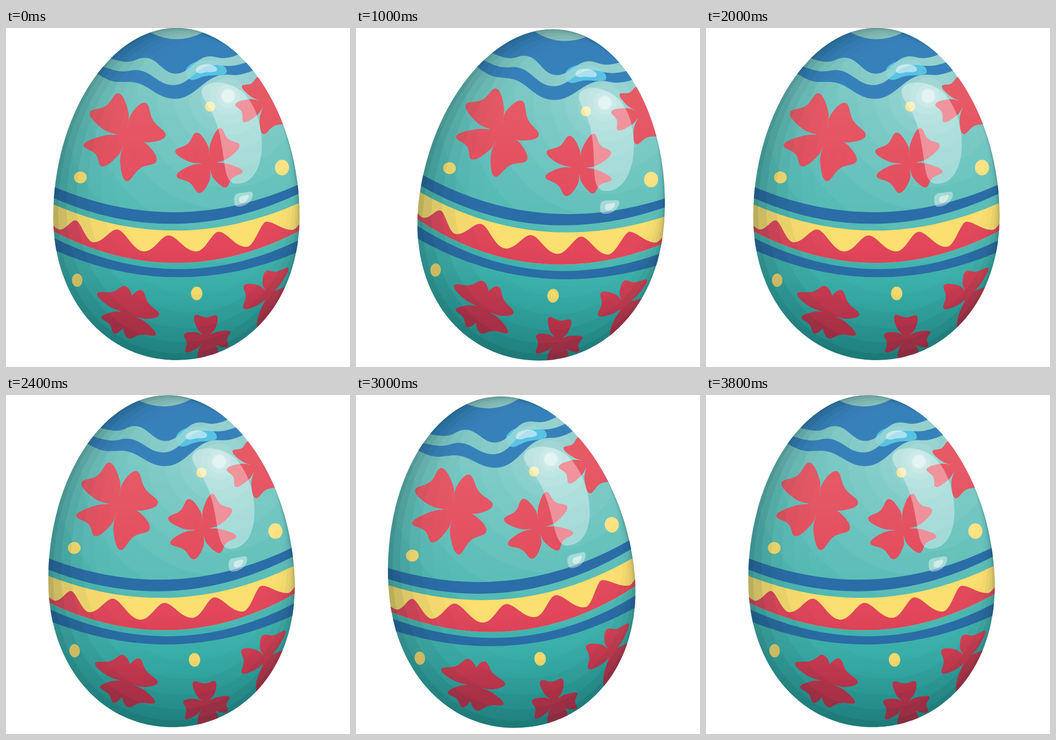
Recreate the animation shown at these times as an HTML page. Size 754 px wide and 742 px high, loop 4000 ms.

```html
<!DOCTYPE html>
<html lang="en">
<head>
<meta charset="utf-8">
<title>Rocking egg</title>
<style>
  html, body { margin: 0; width: 100%; height: 100%; overflow: hidden; background: #fff; }
  svg { display: block; width: 100vw; height: 100vh; }
</style>
</head>
<body>
<svg viewBox="0 0 754 742">
  <defs>
    <clipPath id="shell"><path id="shellPath" shape-rendering="crispEdges"/></clipPath>
    <clipPath id="blues"><path id="bluesPath"/></clipPath>
    <linearGradient id="teal" gradientUnits="userSpaceOnUse" x1="0" y1="0" x2="0" y2="726">
      <stop offset="0" stop-color="#74c2bd"/>
      <stop offset=".3" stop-color="#5bbbb6"/>
      <stop offset=".6" stop-color="#4cb7b1"/>
      <stop offset=".78" stop-color="#3bb1ac"/>
      <stop offset="1" stop-color="#29a5a0"/>
    </linearGradient>
    <linearGradient id="red" gradientUnits="userSpaceOnUse" x1="0" y1="150" x2="0" y2="650">
      <stop offset="0" stop-color="#e65a66"/>
      <stop offset=".65" stop-color="#e2475b"/>
      <stop offset="1" stop-color="#cb344e"/>
    </linearGradient>
    <linearGradient id="dusk" gradientUnits="userSpaceOnUse" x1="0" y1="540" x2="0" y2="726">
      <stop offset="0" stop-color="#04252a" stop-opacity="0"/>
      <stop offset="1" stop-color="#04252a" stop-opacity=".1"/>
    </linearGradient>
  </defs>
  <g id="egg"><g id="art" clip-path="url(#shell)"></g></g>
</svg>
<script>
const $ = id => document.getElementById(id);
const art = $('art');
const EGG = 'M373.5 0C524 0 643.5 199 643.5 412C643.5 598 526 727 373.5 727' +
            'C221 727 103.5 598 103.5 412C103.5 199 223 0 373.5 0Z';
const RED = 'url(#red)', BLUE = '#2b6da7', SKY = '#3781ba', YELLOW = '#fbdf70';
const CYAN = '#3fc8ec', SHADE = '#04252a';

function add(tag, attrs) {
  const el = document.createElementNS('http://www.w3.org/2000/svg', tag);
  for (const k in attrs) el.setAttribute(k, attrs[k]);
  art.appendChild(el);
}
const fill = (d, color, opacity = 1, extra = {}) =>
  add('path', { d, fill: color, 'fill-opacity': opacity, ...extra });
const points = text => text.split(' ').map(p => p.split(',').map(Number));

// curve with level tangents at every crest and dip
function wavy(pts, crest = .42, dip = .42) {
  const last = pts.length - 1;
  const hold = i => i === 0 || i === last ? .1 : pts[i][1] < pts[i - 1][1] ? crest : dip;
  return pts.map(([x, y], i) => {
    if (!i) return `${x} ${y}`;
    const [px, py] = pts[i - 1], w = x - px;
    return `C${px + w * hold(i - 1)} ${py} ${x - w * hold(i)} ${y} ${x} ${y}`;
  }).join('');
}

// open Catmull-Rom curve
function spline(p, k = 4.8) {
  const at = i => p[Math.max(0, Math.min(p.length - 1, i))];
  return p.slice(1).map((c, i) => {
    const [a, b, e] = [at(i - 1), p[i], at(i + 2)];
    const ctrl = (q, from, to, s) => [0, 1].map(j => q[j] + s * (to[j] - from[j]) / k);
    return `C${ctrl(b, a, c, 1)} ${ctrl(c, b, e, -1)} ${c}`;
  }).join('');
}

// four heart petals around a centre; two lobe tips each, clockwise
function clover(cx, cy, lobes) {
  const tips = points(lobes).map(([x, y]) => [x - cx, y - cy]);
  const n = tips.length, tip = i => tips[(i + n) % n];
  const mix = (a, s, b, t) => [cx + a[0] * s + b[0] * t, cy + a[1] * s + b[1] * t];
  let d = '';
  for (let i = 0; i < n; i += 2) {
    const a = tip(i), b = tip(i + 1);
    const petal = [mix(tip(i - 1), .11, a, .11), mix(a, .7, b, -.2), mix(a, 1, b, 0),
      mix(a, .46, b, .46), mix(b, 1, a, 0), mix(b, .7, a, -.2), mix(b, .11, tip(i + 2), .11)];
    d += (i ? 'L' : 'M') + petal[0] + spline(petal);
  }
  fill(d + 'Z', RED);
}

// belt between two bowed edges: left, control and right heights
const belt = ([l, c, r], [l2, c2, r2], color) =>
  fill(`M104 ${l}Q373 ${c} 643 ${r}h3V${r2}h-3Q373 ${c2} 104 ${l2}h-3V${l}Z`, color);
const dot = (cx, cy, rx, ry) => add('ellipse', { cx, cy, rx, ry, fill: YELLOW });

function glow() {
  for (let i = 11; i >= 0; i--)
    add('circle', { cx: 487, cy: 149, r: 14 + 2.9 * i * i, fill: '#fff',
      'fill-opacity': .04 + .3 * Math.exp(-.6 * i) });
}

function waves() {
  const rim = points('220,64 266,74 304,65 372,100 447,62 476,66 530,50');
  const upper = points('200,80 257,95 284,92 367,125 455,81 490,83 545,69');
  const lower = points('185,92 246,118 270,118 370,155 482,102 502,103 560,86');
  const crown = `M220 -5L${wavy(rim)}V-5Z`;
  const wave = `M${wavy(upper)}L${wavy(lower.reverse())}Z`;
  $('bluesPath').setAttribute('d', crown + wave);
  fill(crown, SKY);
  fill(wave, SKY);
  fill('M300 -5L317 10Q373 39 432 10L450 -5Z', '#8bc4bf');
}

function belts() {
  belt([347, 462, 342], [372, 490, 362], BLUE);
  belt([386, 502, 383], [445, 584, 444], YELLOW);
  const zigzag = points('101,430 118,441 152,421 192,469 243,441 303,489 356,454 ' +
    '417,489 466,446 527,479 571,424 628,442 646,426');
  fill(`M${wavy(zigzag, .3, .42)}V444H643Q373 584 104 445H101Z`, RED);
  belt([459, 594, 464], [485, 604, 489], BLUE);
}

function flowers() {
  clover(263, 237, '184,186 247,143 306,164 350,235 330,291 264,335 211,303 170,256');
  clover(446, 297, '371,270 418,229 469,219 512,257 519,314 481,349 424,361 374,324');
  clover(568, 162, '522,206 503,166 517,128 553,108 578,112 622,170 615,206 564,232');
  clover(268, 625, '200,581 262,565 297,574 336,627 328,672 268,679 238,669 209,633');
  clover(439, 678, '414,629 462,630 491,664 486,698 464,714 422,726 394,710 391,670');
  clover(576, 582, '521,614 522,563 569,533 619,525 645,580 560,664');
}

// shade outside ever smaller shells
function shading() {
  for (let i = 1; i <= 6; i++) {
    const s = 1 - .024 * i ** 1.4;
    fill(`M-754 -742H1508V1484H-754Z${EGG}`, SHADE, .1 - .015 * i, {
      'fill-rule': 'evenodd',
      transform: `translate(${560 * (1 - s)} ${100 * (1 - s)}) scale(${s})`
    });
  }
  fill('M0 500H754V742H0Z', 'url(#dusk)');
}

function gloss() {
  const drop = 'M429 137C434 114 480 112 515 137C575 185 580 341 506 341' +
               'C465 341 490 250 446 175C436 158 428 150 429 137Z';
  const bead = 'M394 95C396 76 428 67 456 73C480 79 488 92 482 100' +
               'C462 108 450 98 420 111C402 119 394 108 394 95Z';
  const onBlue = { 'clip-path': 'url(#blues)' };
  fill(drop, CYAN, .6, onBlue);
  fill(bead, CYAN, .7, onBlue);
  fill(bead, '#8fe0ea', .35);
  fill(drop, '#fff', .36, { mask: 'none' });
  fill('M416 92C418 78 452 74 462 88C466 100 446 95 436 97C424 101 416 99 416 92Z', '#fff', .5);
  fill('M500 375C500 360 512 362 524 360C541 356 543 360 540 370C534 386 520 391 508 391C502 391 500 384 500 375Z', '#fff', .4);
  fill('M511 374C513 366 522 368 528 365C535 365 532 371 529 376C523 383 510 387 511 374Z', '#fff', .5);
}

function paint() {
  $('shellPath').setAttribute('d', EGG);
  fill(EGG, 'url(#teal)');
  dot(163, 327, 14, 13);
  dot(605, 305.5, 15.5, 17);
  dot(447.5, 172, 11, 11);
  dot(156, 552, 11.5, 14.5);
  dot(418, 581, 12.5, 15);
  glow();
  waves();
  belts();
  flowers();
  shading();
  gloss();
}

// twelve poses per cycle, shown on a 200 ms beat
function angle(ms) {
  const beat = Math.floor(ms % 4000 / 200);
  const step = Math.floor(beat * 3 / 5);
  return 2 * (Math.abs((step + 9) % 12 - 6) - 3);
}

function tick() {
  $('egg').setAttribute('transform', `rotate(${angle(performance.now())} 377 717)`);
  requestAnimationFrame(tick);
}
paint();
tick();
</script>
</body>
</html>
```
